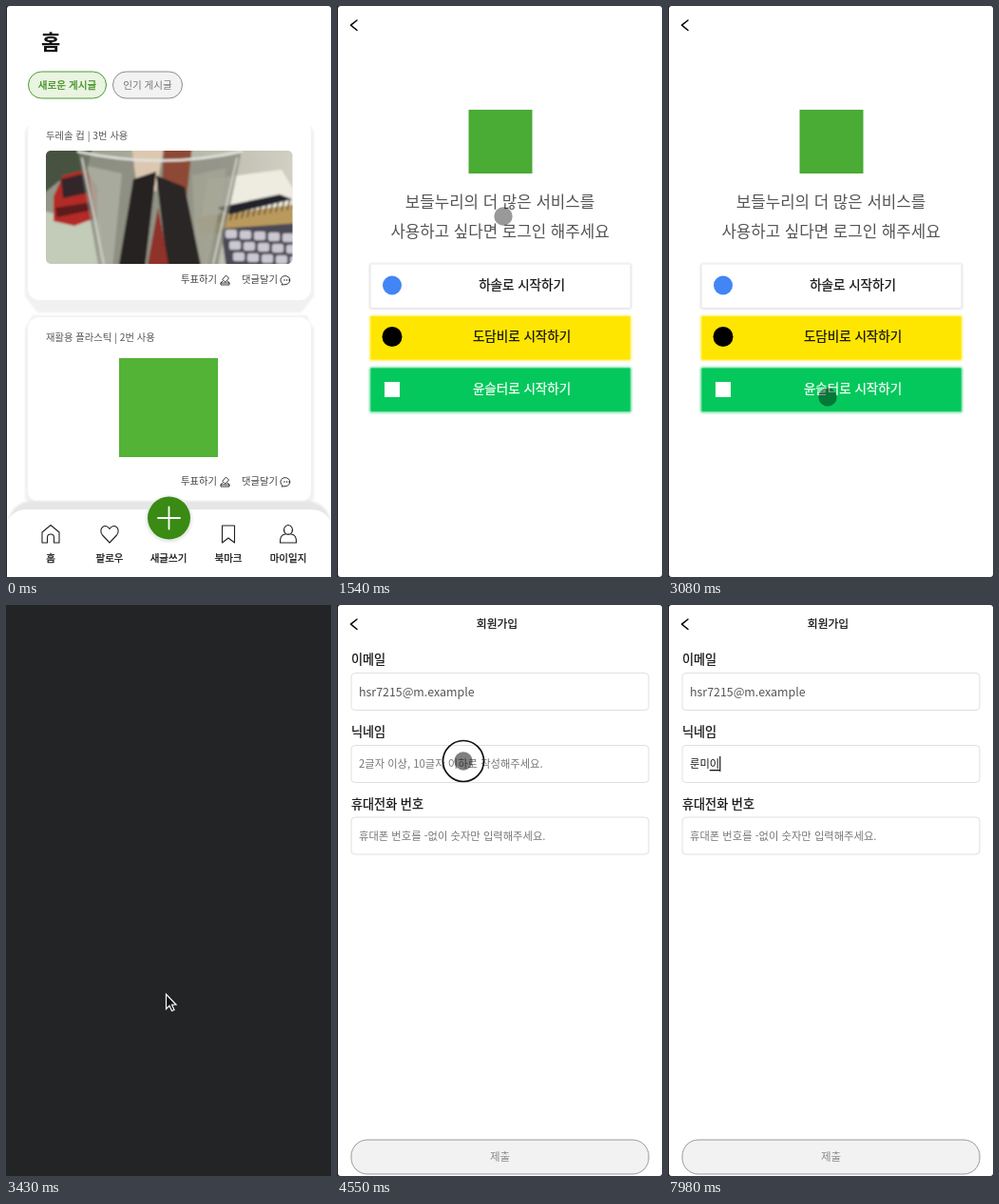
These frames come from a looping animation (342x600 px, 8 s). An HTML page:

```html
<!DOCTYPE html>
<html lang="ko">
<head>
<meta charset="utf-8">
<title>App walkthrough</title>
<style>
  html, body { margin: 0; width: 100%; height: 100%; overflow: hidden; background: #232426; }
  svg { display: block; width: 342px; height: 600px; }
  text { font-family: "Noto Sans CJK KR", "Noto Sans CJK", "Noto Sans", sans-serif; white-space: pre; }
  .medium { stroke: currentColor; stroke-width: .25; }
  .line { fill: none; stroke: #222; stroke-width: 1.1; stroke-linecap: round; stroke-linejoin: round; }
  .field { fill: #fff; stroke: #e0e0e0; }
</style>
</head>
<body>
<svg id="stage" viewBox="0 0 342 600"></svg>
<script>
const LOOP = 8000, STEP = 70;

// Text placed by its vertical centre.
const label = (x, y, size, str, { fill = '#111', weight = 400, anchor = 'start', id = '', medium = false } = {}) =>
  `<text ${id && `id="${id}"`} ${medium ? `class="medium" color="${fill}"` : ''} x="${x}" y="${y + size * .37}" font-size="${size}" fill="${fill}" font-weight="${weight}" text-anchor="${anchor}">${str}</text>`;
const mid = (x, y, size, str, opts = {}) => label(x, y, size, str, { ...opts, anchor: 'middle' });
const box = (x, y, w, h, r, attrs) => `<rect x="${x}" y="${y}" width="${w}" height="${h}" rx="${r}" ${attrs}/>`;
const line = (d, attrs = '') => `<path class="line" d="${d}" ${attrs}/>`;
const shape = (d, fill, attrs = '') => `<path d="${d}" fill="${fill}" ${attrs}/>`;
const page = box(1, 0, 341, 600, 3, 'fill="#fff"');
const back = line('M21 15L14.5 20.2L21 25.5', 'style="stroke:#000;stroke-width:1.5"');

const card = (top, bottom, title, picture) => `
  ${shape(`M20 ${top + 14}L28 ${top}H316L324 ${top + 14}V${bottom - 4}L311 ${bottom + 13}H33L20 ${bottom - 4}Z`, '#f1f1f1', 'filter="url(#soft)"')}
  ${box(23, top + 2, 298, bottom - top - 2, 12, 'fill="#fff"')}
  ${label(42, bottom - 173, 10.3, title, { fill: '#555' })}
  ${picture}
  ${label(184, bottom - 21.5, 10.3, '투표하기', { fill: '#444' })}
  ${label(248, bottom - 21.5, 10.3, '댓글달기', { fill: '#444' })}
  <g transform="translate(0 ${bottom - 309})">
    ${line('M228 289l-2 2v2h9v-2l-2-2M228 287l3.5-4 3 3-3.5 4zM226 291h9', 'style="stroke-width:.9"')}
    ${line('M290.500 291.500A5 4.500 0 1 1 294 292.600L290.500 293Z', 'style="stroke-width:.9"')}
    ${[293, 295.5, 298].map(x => `<circle cx="${x}" cy="288" r=".7"/>`).join('')}
  </g>`;

const keys = Array.from({ length: 15 }, (_, i) => {
  const row = Math.floor(i / 5), col = i % 5;
  return box(231 + col * 15 + row * 4, 235 + row * 12 + col, 12, 9, 2, 'fill="#cbc8d2"');
}).join('');
const rings = Array.from({ length: 14 }, (_, i) =>
  line(`M${224 + i * 6} ${227 - i * 1.1}l3 -11`, 'style="stroke:#5a4a38;stroke-width:1.5"')).join('');

const photo = `<g clip-path="url(#photoClip)"><g filter="url(#blur)">
  ${box(36, 146, 272, 131, 0, 'fill="url(#desk)"')}
  ${shape('M36 146H92L84 176L56 184L36 200Z', '#46523f')}
  ${shape('M36 215L100 228V277H36Z', '#c3cbb9')}
  ${shape('M50 200L60 178L84 172L96 190V222L72 231L50 226Z', '#b32b28')}
  ${shape('M58 182L82 176L88 196L60 202Z', '#33262a')}
  ${shape('M52 212L92 206V214L54 222Z', '#5c1d1f')}
  ${shape('M212 182L290 172L302 192V222L206 222Z', '#eeebe0')}
  ${shape('M200 222L308 208V232L206 240Z', '#b99a5c')}${rings}
  ${shape('M222 212L288 198L301 203L236 219Z', '#22242a')}
  ${shape('M226 234L308 228V277H232Z', '#4b4956')}${keys}
  ${shape('M76 152Q162 176 248 152L222 277H98Z', '#85867a', 'opacity=".7"')}
  ${shape('M86 168L122 176L112 277H100Z', '#b9bdb0', 'opacity=".6"')}
  ${shape('M196 178L232 170L212 277H200Z', '#a9a899', 'opacity=".7"')}
  ${shape('M132 146H166L158 195L138 192Z', '#dcc7b0')}
  ${shape('M166 146H196L190 202L164 190Z', '#8d4a35')}
  ${shape('M118 277L134 182L158 174L146 277Z', '#252424')}
  ${shape('M158 178L188 190L206 277H170Z', '#2c2826')}
  ${shape('M148 277L160 212L172 277Z', '#8f3029')}
  ${line('M76 153Q162 172 248 153', 'style="stroke:#e3e5dd;stroke-width:2.5"')}
  ${line('M80 160L103 271M243 160L218 271', 'style="stroke:#d5d8cf;stroke-width:1.6"')}
</g></g>`;

const navItems = [
  [47, '홈', 'M38 553L47 545.500L56 553V564H50.500V558.500a3.500 3.500 0 0 0-7 0V564H38Z'],
  [109, '팔로우', 'M109 564L101.500 556C96.500 550 104 542 109 549.500C114 542 121.500 550 116.500 556Z'],
  [171, '새글쓰기', ''],
  [234, '북마크', 'M227.500 546h13V564L234 559L227.500 564Z'],
  [297, '마이일지', 'M297 545.500a4.500 5 0 1 1-.01 0M288.500 564Q288 555.500 294 555H300Q306 555.500 305.500 564Z']
];

const home = `${page}
  ${label(37, 38, 22, '홈', { weight: 700 })}
  ${box(23.5, 69, 82, 28, 14, 'fill="#e9f4e1" stroke="#4d9a34"')}
  ${mid(64.500, 83, 10.6, '새로운 게시글', { fill: '#3c8a1c', medium: true })}
  ${box(112.5, 69, 73, 28, 14, 'fill="#f2f2f2" stroke="#8c8c8c"')}
  ${mid(149, 83, 10.6, '인기 게시글', { fill: '#777' })}
  ${card(118, 309, '두레솔 컵 | 3번 사용', photo)}
  ${box(8, 100, 328, 26, 0, 'fill="#fff"')}
  ${card(325, 521, '재활용 플라스틱 | 2번 사용', box(119, 370, 104, 104, 0, 'fill="#52b336"'))}
  ${shape('M3 540Q6 524 24 520H320Q338 524 341 540Z', '#e6e6e6', 'filter="url(#soft)"')}
  ${shape('M1 600V548Q2 530 22 529H321Q341 530 342 548V600Z', '#fff')}
  <circle cx="171.500" cy="539" r="24.500" fill="#e8e8e8" filter="url(#soft)"/>
  <circle cx="171.500" cy="538" r="22.500" fill="#398b14"/>
  ${line('M160 538H183M171.500 526.500V549.500', 'style="stroke:#fff;stroke-width:1.8"')}
  ${navItems.map(([x, name, d]) => line(d) + mid(x, 580, 10.5, name, { medium: true })).join('')}`;

const loginButton = (y, fill, color, str, mark, { shadow = fill, id = '' } = {}) => `<g ${id && `id="${id}"`}>
  ${box(34, y - .5, 276, 48, 2, `fill="${shadow}" opacity=".6" filter="url(#soft)"`)}
  ${box(35.5, y + .5, 273, 45.5, 1, `fill="${fill}"`)}${mark}
  ${mid(194.5, y + 22, 13.5, str, { fill: color, medium: true })}</g>`;

const login = `${page}${back}
  ${box(138.5, 109, 67, 67, 0, 'fill="#4aab35"')}
  ${mid(171.5, 206, 16.8, '보들누리의 더 많은 서비스를', { fill: '#555' })}
  ${mid(171.5, 237, 16.8, '사용하고 싶다면 로그인 해주세요', { fill: '#555' })}
  ${loginButton(271, '#fff', '#111', '하솔로 시작하기', '<circle cx="58" cy="293.500" r="10" fill="#4285f4"/>', { shadow: '#ccc' })}
  ${loginButton(325.5, '#ffe600', '#111', '도담비로 시작하기', '<circle cx="58" cy="347.500" r="10.500"/>')}
  ${loginButton(380, '#05c85c', '#fff', '윤슬터로 시작하기', box(50, 395, 16, 16, 0, 'fill="#fff"'), { id: 'greenButton' })}`;

const hint = '2글자 이상, 10글자 이하로 작성해주세요.';
const field = y => box(15, y, 313, 39, 4, 'class="field"');
const signup = `${page}${back}
  ${mid(168.5, 20, 11.8, '회원가입', { medium: true })}
  ${label(15, 57.5, 13.1, '이메일', { medium: true })}${field(71.5)}
  ${label(23, 91, 12.4, 'hsr7215@m.example', { fill: '#555' })}
  ${label(15, 133.5, 13.1, '닉네임', { medium: true })}${field(147.5)}
  ${label(23, 166.5, 11.3, hint, { fill: '#777', id: 'placeholder' })}
  ${label(23, 166.5, 11.3, '', { id: 'typed' })}
  ${box(44, 173, 10, 1.3, 0, 'id="underline" fill="#111"')}
  ${box(23, 159, 1.2, 16, 0, 'id="caret" fill="#111"')}
  ${label(15, 201.5, 10.2, hint, { fill: '#b5290f', id: 'error' })}
  <g id="phone">${label(15, 209.5, 13.1, '휴대전화 번호', { medium: true })}${field(223)}
  ${label(23, 242.5, 11.3, '휴대폰 번호를 -없이 숫자만 입력해주세요.', { fill: '#777' })}</g>
  ${box(15, 562, 313, 36, 17, 'fill="#f2f2f2" stroke="#999"')}
  ${mid(171.5, 579.5, 11.5, '제출', { fill: '#888' })}`;

document.getElementById('stage').innerHTML = `<defs>
    <filter id="soft" x="-10%" y="-20%" width="120%" height="140%"><feGaussianBlur stdDeviation="1.2"/></filter>
    <filter id="blur"><feGaussianBlur stdDeviation=".8"/></filter>
    <clipPath id="photoClip">${box(42, 152, 259.5, 119, 5, '')}</clipPath>
    <linearGradient id="desk"><stop stop-color="#8f9584"/><stop offset="1" stop-color="#d3d0c4"/></linearGradient>
  </defs>
  <g id="home">${home}</g><g id="login">${login}</g>
  <g id="dark">${box(0, 0, 342, 600, 0, 'fill="#232426"')}
    ${shape('M168.500 409V424.500L172 421L174.500 426.500L177 425.500L174.500 420H179Z', '#111', 'stroke="#fff" stroke-width="1.200"')}</g>
  <g id="signup">${signup}</g>
  <g id="pointer"><circle id="dot" r="9.700" fill="#000"/><circle id="ring" fill="none"/></g>`;

const el = Object.fromEntries([...document.querySelectorAll('[id]')].map(node => [node.id, node]));
const show = (node, on) => { node.style.display = on ? '' : 'none'; };
const latest = (list, t) => list.filter(item => item[0] <= t).pop();

const screens = [[0, 'home'], [1400, 'login'], [3430, 'dark'], [3570, 'signup']];
const path = [[350, 186, 386], [630, 162, 296], [910, 175, 208], [1120, 175, 208], [1260, 175, 221], [1540, 175, 221],
  [2170, 227, 365], [2590, 168, 411], [3500, 168, 411], [4340, 133, 164], [4760, 133, 164], [5040, 176, 142],
  [5110, 176, 142], [5460, 168, 187]];
// start, end, radius from, radius to, colour
const taps = [[1120, 1260, 12, 12, '#777'], [2590, 2870, 10.8, 10.8, '#b5dcc2'], [2870, 3080, 14, 21, '#111'], [4550, 4760, 21.5, 27, '#111']];
const typing = [[0, ''], [5740, 'd'], [5810, 'dl'], [6300, 'd'], [6370, ''], [7140, 'ㄹ'], [7280, '루'],
  [7420, '룬'], [7630, '룬ㅁ'], [7700, '룬미'], [7840, '룬밍'], [7980, '룬미이']];

function pointerAt(t) {
  const i = path.findIndex(point => point[0] > t);
  if (i < 1) return path[i < 0 ? path.length - 1 : 0].slice(1);
  const [t0, x0, y0] = path[i - 1], [t1, x1, y1] = path[i];
  const u = (t - t0) / (t1 - t0), e = u * u * (3 - 2 * u);
  return [x0 + (x1 - x0) * e, y0 + (y1 - y0) * e];
}

function drawPointer(t, screen) {
  show(el.pointer, t >= 350 && t < 5460 && screen !== 'dark');
  el.pointer.setAttribute('transform', `translate(${pointerAt(t)})`);
  const tap = taps.find(([from, to]) => t >= from && t < to);
  show(el.ring, tap);
  el.dot.setAttribute('opacity', tap ? .5 : .4);
  if (!tap) return;
  const [from, to, r0, r1, color] = tap, u = (t - from) / (to - from);
  el.ring.setAttribute('r', r0 + (r1 - r0) * u);
  el.ring.setAttribute('stroke', color);
  el.ring.setAttribute('stroke-width', r1 > 20 ? 1.7 : 1.4);
  el.ring.setAttribute('opacity', r1 > r0 ? 1 - u * .8 : 1);
}

function drawForm(t) {
  const str = latest(typing, t)[1], invalid = str.length === 1;
  el.typed.textContent = str;
  show(el.placeholder, !str);
  show(el.error, invalid);
  el.phone.setAttribute('transform', `translate(0 ${invalid ? 17.5 : 0})`);

  const composing = /[ㄱ-힣]$/.test(str);
  const end = 23 + (str ? el.typed.getComputedTextLength() : 0);
  const start = 23 + (str.length > 1 ? el.typed.getSubStringLength(0, str.length - 1) : 0);
  show(el.underline, composing);
  el.underline.setAttribute('x', start);
  el.underline.setAttribute('width', end - start);
  el.caret.setAttribute('x', end);
  show(el.caret, composing || (t >= 4690 && t < 5180) || (t >= 6370 && t < 6860));
}

function frame(now) {
  const t = Math.floor((now % LOOP) / STEP) * STEP;
  const screen = latest(screens, t)[1];
  for (const [, name] of screens) show(el[name], name === screen);
  el.greenButton.setAttribute('opacity', t >= 2940 && t < 3080 ? .75 : 1);
  if (screen === 'signup') drawForm(t);
  drawPointer(t, screen);
}

let startTime;
function tick(now) {
  startTime ??= now;
  frame(now - startTime);
  requestAnimationFrame(tick);
}
frame(0);
requestAnimationFrame(tick);
</script>
</body>
</html>
```
